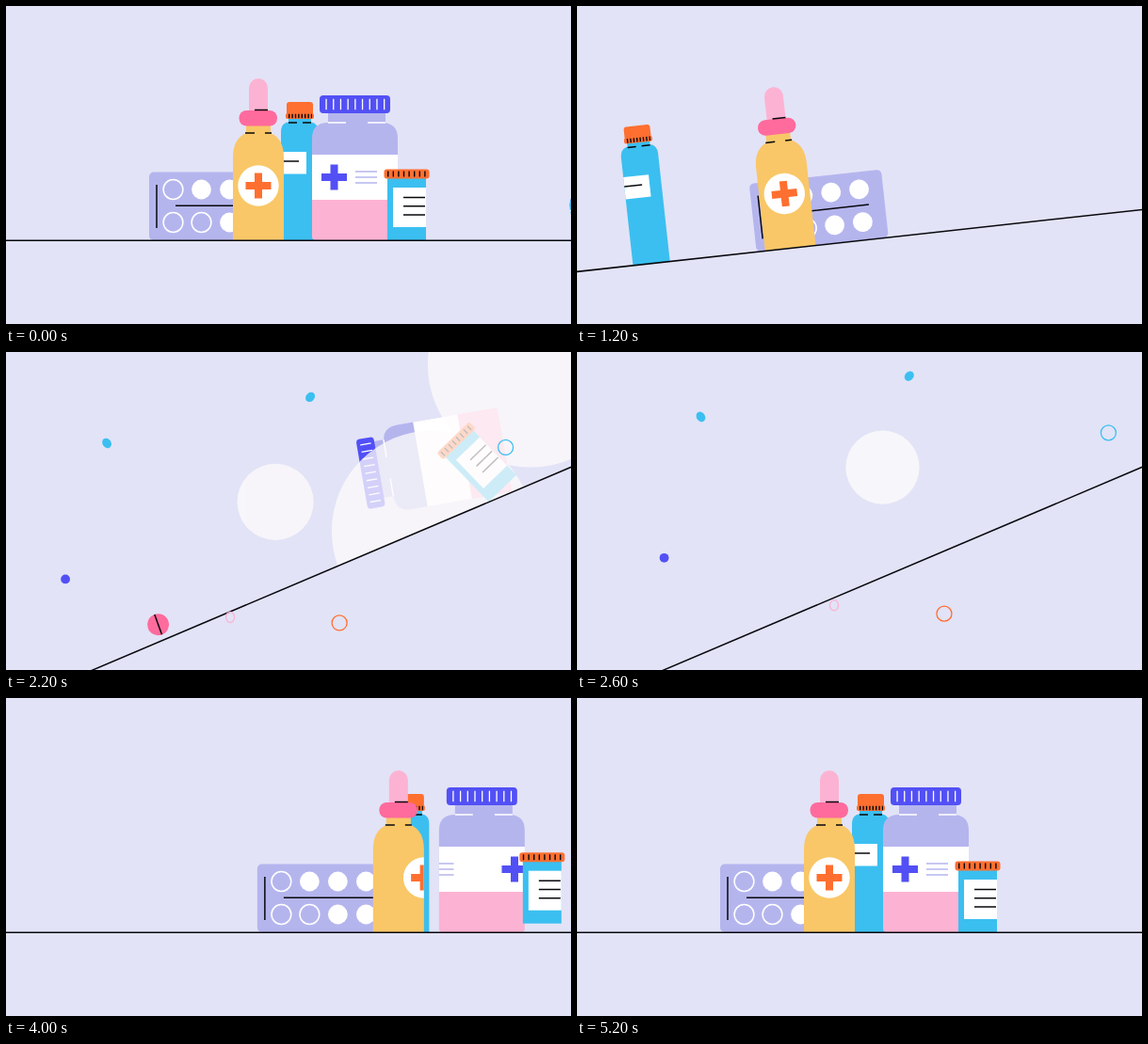
Recreate the animation shown at these times as an HTML page. Size 600 px wide and 338 px high, loop 5300 ms.

```html
<!DOCTYPE html>
<html lang="en">
<head>
<meta charset="utf-8">
<title>Medicine shelf</title>
<style>
  html, body { margin: 0; width: 100%; height: 100%; overflow: hidden; background: #e2e3f7; }
  svg { display: block; width: 600px; height: 338px; }
  .bg { fill: #e2e3f7 } .lav { fill: #b5b5ee } .yel { fill: #f9c767 } .org { fill: #ff6f30 }
  .blu { fill: #3bbff0 } .ind { fill: #5250f5 } .pnk { fill: #fcb3d3 } .hot { fill: #ff6b9d } .wht { fill: #fff }
  .ink { stroke: #08080c; stroke-width: 1.5; fill: none }
  .chalk { stroke: #fff; stroke-width: 1.5; fill: none }
  .rule { stroke: #b5b5ee; stroke-width: 1.3; fill: none }
  .ring { fill: none; stroke-width: 1.3 }
</style>
</head>
<body>
<svg viewBox="0 0 600 338">
  <defs>
    <clipPath id="yelClip"><path id="yelBody" d="M0 0V-88Q0 -108 14 -114H40Q54 -108 54 -88V0Z"/></clipPath>
    <clipPath id="jarClip"><rect y="-91" width="91" height="48"/></clipPath>
    <g id="badge">
      <circle class="wht" cx="27" cy="-58" r="21.7"/>
      <path class="org" d="M13.5 -62h9.5v-9.5h8v9.5h9.5v8h-9.5v9.5h-8v-9.5h-9.5z"/>
    </g>
    <g id="marks">
      <path class="ind" d="M10 -71h9.5v-9.5h8v9.5h9.5v8h-9.5v9.5h-8v-9.5h-9.5z"/>
      <path class="rule" d="M46 -73h23m-23 6h23m-23 6h23"/>
    </g>
  </defs>

  <g id="slope">
    <g id="blister">
      <rect class="lav" y="-72.5" width="141" height="72.5" rx="5"/>
      <g id="pockets"></g>
      <path class="ink" d="M8 -59V-13M28 -36.7H124"/>
    </g>

    <g id="blue">
      <rect class="blu" x="8" y="-131" width="24" height="12"/>
      <path class="blu" d="M0 0V-115Q0 -126 11 -126H28.5Q39.5 -126 39.5 -115V0Z"/>
      <path class="ink" d="M8 -125h9m6 0h9"/>
      <rect class="org" x="6" y="-147" width="28" height="15" rx="3"/>
      <rect class="org" x="5" y="-135" width="30" height="6" rx="2"/>
      <path class="ink" d="M8 -132H33" stroke-dasharray="1.4 2" style="stroke-width:4.5"/>
      <rect class="wht" y="-94" width="27" height="23.5"/>
      <path class="ink" d="M0 -84H19"/>
    </g>

    <g id="dropper">
      <rect class="pnk" x="17" y="-172" width="20" height="44" rx="10"/>
      <rect class="yel" x="14" y="-124" width="26" height="14"/>
      <use href="#yelBody" class="yel"/>
      <rect class="hot" x="6.5" y="-138" width="40.5" height="16.5" rx="8"/>
      <path class="ink" d="M23 -138.5H37M13 -114h10m11 0h7"/>
      <g clip-path="url(#yelClip)"><g class="label">
        <use href="#badge"/><use href="#badge" x="-90"/>
      </g></g>
    </g>

    <g id="jar">
      <rect class="lav" x="17" y="-137" width="61" height="20"/>
      <path class="lav" d="M0 -43V-108Q0 -125 17 -125H74Q91 -125 91 -108V-43Z"/>
      <path class="chalk" d="M17 -125h19m23 0h19"/>
      <rect class="wht" y="-91" width="91" height="48"/>
      <path class="pnk" d="M0 -43H91V-4Q91 0 87 0H4Q0 0 0 -4Z"/>
      <rect class="ind" x="8" y="-154" width="75" height="19" rx="4"/>
      <path class="chalk" d="M14.4 -144.5H78" stroke-dasharray="1.3 6.4" style="stroke-width:11.5"/>
      <g clip-path="url(#jarClip)"><g class="label">
        <use href="#marks"/><use href="#marks" x="-110"/>
      </g></g>
    </g>

    <g id="small">
      <rect class="blu" y="-68" width="41" height="68"/>
      <rect class="org" x="-3.5" y="-75.5" width="48" height="10" rx="3"/>
      <path class="ink" d="M0 -70.5H42" stroke-dasharray="1.4 4.2" style="stroke-width:6"/>
      <rect class="wht" x="6" y="-56" width="35" height="42"/>
      <path class="ink" d="M17 -45.5h23m-23 9.3h23m-23 9.3h23"/>
    </g>

    <g id="tablet">
      <path class="ind" id="rim"/>
      <ellipse class="blu" id="face" rx="27"/>
      <path class="chalk" id="split"/>
    </g>

    <g id="pinkPill">
      <circle class="hot" r="11.5"/>
      <path class="ink" d="M-11.3 0H11.3"/>
    </g>
  </g>

  <g id="glow" fill="#fefcfb" opacity=".75"></g>

  <g id="ground">
    <rect class="bg" x="-800" width="1600" height="800"/>
    <path class="ink" d="M-800 .3H800"/>
  </g>

  <g id="dots">
    <ellipse class="blu" rx="4.5" ry="5.6" transform="rotate(-35)"/>
    <ellipse class="blu" rx="4.5" ry="5.6" transform="rotate(42)"/>
    <circle class="ind" r="4.9"/>
    <ellipse class="ring" stroke="#fcb3d3" rx="4.5" ry="5.6"/>
    <circle class="ring" stroke="#ff6f30" r="8"/>
    <circle class="ring" stroke="#3bbff0" r="8"/>
  </g>
</svg>

<script>
const LOOP = 5.3, RETURN = 3; // seconds
const SVG = 'http://www.w3.org/2000/svg';
const $ = id => document.getElementById(id);
const set = (el, attrs) => { for (const k in attrs) el.setAttribute(k, attrs[k]); };
const make = (parent, tag, attrs) => {
  const el = document.createElementNS(SVG, tag);
  set(el, attrs);
  return parent.appendChild(el);
};
const part = (t, a, b) => Math.min(1, Math.max(0, (t - a) / (b - a)));
const ease = (t, a, b) => { const u = part(t, a, b); return u * u * (3 - 2 * u); };
const pulse = (t, a, b) => Math.sin(Math.PI * part(t, a, b));

// Slope angle: slow start, firm landing at 23 degrees, quick return to level.
function tilt(t) {
  const x = part(t, 0, 1.95), a = x ** 3, b = 11 * (1 - x) ** 3;
  return 23 * a / (a + b) * (1 - ease(t, 3.6, 4));
}

// Camera pan down the slope: eases in, then runs at constant speed.
function pan(t) {
  const u = Math.max(0, t - 1.165), w = .3;
  return 1300 * (u < w ? u * u / (2 * w) : u - w / 2);
}

// Rush in from the right, swing past the resting place and settle.
function swing(t) {
  const u = t - 4;
  if (u < 0) return 1 - 1.1 * u + 25 * u * u;
  return Math.cos(3.6 * u + .3) / Math.cos(.3) * (1 - ease(u, 0, .85));
}

// x: rest, slide: run down the slope, fall: start of toppling,
// lead: distance to rest at 4 s, hop: [height, from, to], spin: label travel per pixel
const items = [
  { id: 'blister', x: -149, slide: -100, lead: 115 },
  { id: 'blue', x: -9, slide: 442, fall: 1.42, lead: 118 },
  { id: 'dropper', x: -60, slide: 59, fall: 1.36, lift: 62, lead: 149, hop: [26, 4.2, 4.7], spin: .18 },
  { id: 'jar', x: 24, slide: 904, fall: 1.739, lead: 135, hop: [10, 4.6, 5], spin: .42 },
  { id: 'small', x: 104, slide: 1011, fall: 1.959, lead: 144, hop: [12, 3.75, 4.1] }
];

function drawItem(t, { id, x, slide, fall = LOOP, lift = 0, lead, hop = [0, 0, 1], spin }) {
  const leaving = t < RETURN;
  const move = leaving ? pan(t) - 15 * ease(t, .4, .85) - slide * ease(t, .8, 1.6) : lead * swing(t);
  const topple = leaving ? part(t, fall, fall + .5) ** 2 : 0;
  const height = lift * topple + hop[0] * pulse(t, hop[1], hop[2]);
  set($(id), { transform: `translate(${x + move} ${-height}) rotate(${-90 * topple})` });
  if (spin) {
    const turn = leaving ? -95 * ease(t, fall, fall + .3) : spin * move;
    set($(id).querySelector('.label'), { transform: `translate(${turn})` });
  }
}

// A disc that rolls in, bounces, tips over and slides away.
function drawTablet(t) {
  const tip = ease(t, .3, .8), rest = 1 - part(t, 0, .8);
  const q = 1 - .56 * tip, ry = 27 * q, depth = 11.5 * Math.sqrt(1 - q * q);
  const x = -222 + 548 * rest * rest;
  const h = 4 + ry + 5 * rest * Math.abs(Math.cos(10 * t));
  const phi = Math.PI / 2 + (x + 222) / 27;
  const cx = 27 * Math.cos(phi), cy = ry * Math.sin(phi);
  set($('tablet'), { transform: `translate(${x - 220 * ease(t, .8, 1.25)} ${-h}) rotate(${12.7 * tip})` });
  set($('rim'), { d: `M-27 0V${-depth}A27 ${ry} 0 0 1 27 ${-depth}V0Z` });
  set($('face'), { ry });
  set($('split'), { d: `M${-cx} ${-cy}L${cx} ${cy}` });
}

// Position and radius at 2.2 s, and travel during the half second before.
const glows = [
  { x: 556, y: 14, r: 109, dx: 522, dy: -256 },
  { x: 452, y: 191, r: 107, dx: 522, dy: -256 },
  { x: 286, y: 159.5, r: 40.5, dx: 48, dy: -46 }
].map(g => ({ ...g, el: make($('glow'), 'circle', {}) }));

function drawGlow(t, { el, x, y, r, dx, dy }) {
  const k = (pan(t) - pan(2.2)) / 650;
  set(el, {
    cx: x + dx * k, cy: y + dy * k,
    r: r * Math.max(0, 1 + .62 * k) * (1 - ease(t, 2.4, 2.9))
  });
}

// Position at 2.2 s, heading in degrees, and travel during the half second before.
const dots = [
  { x: 107, y: 97, dir: 49, reach: 51 },
  { x: 323, y: 48, dir: 37, reach: 81 },
  { x: 63, y: 241.5, dir: 37.5, reach: 74 },
  { x: 238, y: 282, dir: 20, reach: 69 },
  { x: 354, y: 288, dir: 15.3, reach: 73.5 },
  { x: 530.5, y: 101.5, dir: 24.8, reach: 113 }
].map((d, i) => ({ ...d, el: $('dots').children[i] }));
for (const d of dots) {
  const g = make($('dots'), 'g', {});
  g.appendChild(d.el);
  d.el = g;
}

function drawDot(t, { el, x, y, dir, reach }) {
  const a = dir * Math.PI / 180;
  const dist = t < 2.2 ? reach * (t - 2.2) / .5 : 67 * (1 - (1 - part(t, 2.2, 3.4)) ** 2);
  const size = ease(t, 1.22, 1.5) - ease(t, 3.58, 3.78);
  set(el, { transform: `translate(${x + dist * Math.cos(a)} ${y - dist * Math.sin(a)}) scale(${size})` });
}

for (let i = 0; i < 8; i++) {
  const col = i % 4, row = i >> 2;
  make($('pockets'), 'circle', {
    cx: 25.5 + 30 * col, cy: row ? -19 : -54, r: 10.4,
    class: col > row ? 'wht' : 'chalk'
  });
}

function draw(t) {
  const pose = `translate(301 249) rotate(${-tilt(t)})`;
  set($('slope'), { transform: pose });
  set($('ground'), { transform: pose });
  for (const o of items) drawItem(t, o);
  drawTablet(t);
  const roll = pan(t) - 1296;
  set($('pinkPill'), { transform: `translate(${roll} -17) rotate(${84 + (roll + 146) * 5})` });
  for (const g of glows) drawGlow(t, g);
  for (const d of dots) drawDot(t, d);
}

const start = performance.now();
function tick() {
  draw((performance.now() - start) / 1000 % LOOP);
  requestAnimationFrame(tick);
}
tick();
</script>
</body>
</html>
```
